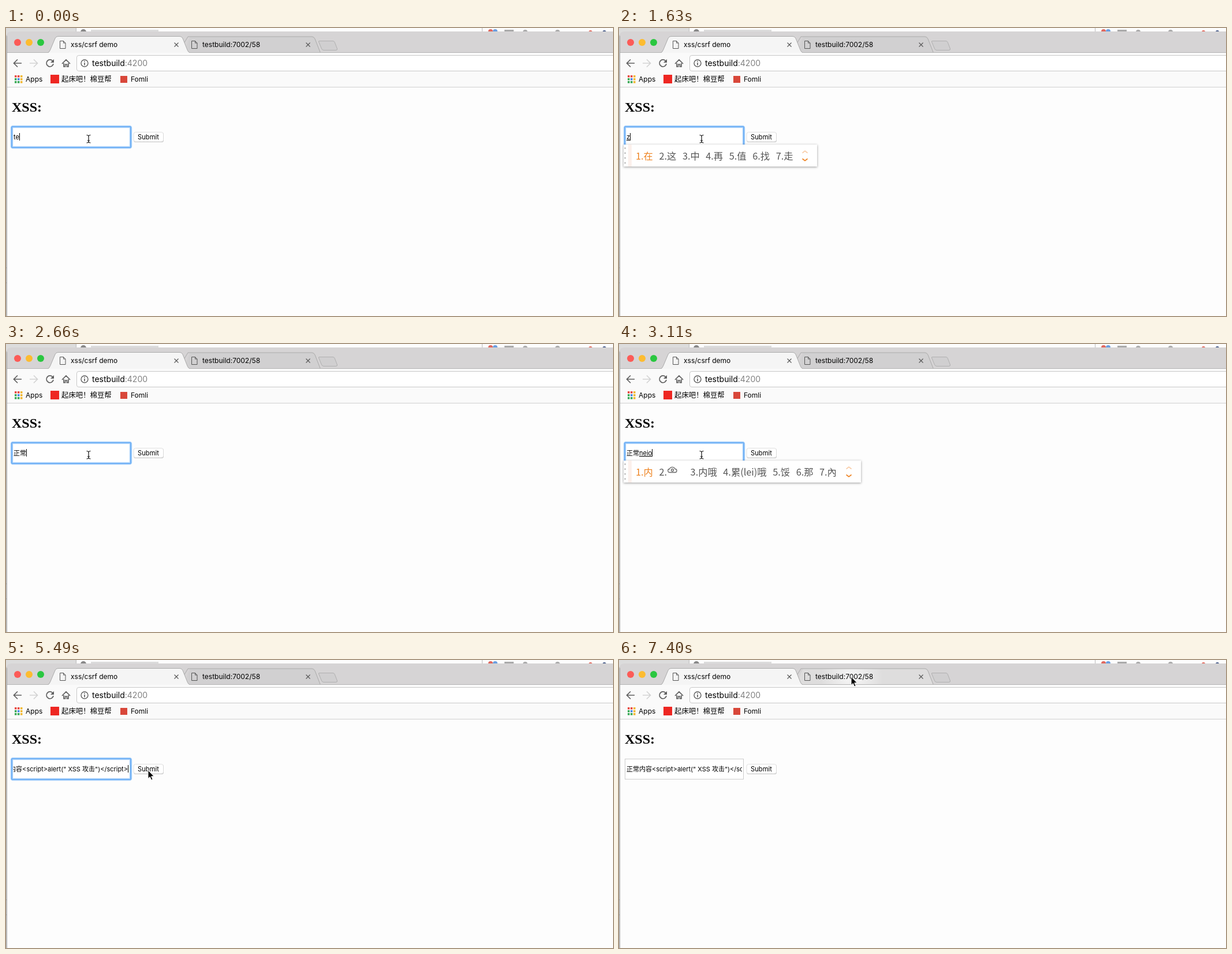
An HTML page for the animation above (7.99 s loop, 1051 by 499 pixels).

```html
<!DOCTYPE html>
<html lang="en">
<head>
<meta charset="utf-8">
<title>Form demo</title>
<style>
  html, body { margin: 0; width: 100%; height: 100%; overflow: hidden; background: #fdfdfd; }
  .layer { position: absolute; left: 0; top: 0; }
  text { font: 12px Inter, "Noto Sans CJK SC", "Noto Sans CJK", sans-serif; white-space: pre; }
  #input { font-size: 11px; }
  #label { font-size: 11.2px; }
  .icon { fill: none; stroke: #5f5f5f; stroke-width: 1.7; }
  .thin { fill: none; stroke: #555; stroke-width: 1; }
  #popup {
    position: absolute; left: 8px; top: 202px; height: 38px; box-sizing: border-box;
    padding: 0 42px 1px 21px; display: flex; gap: 10.6px; align-items: center; white-space: nowrap;
    background: #fff; box-shadow: 0 1px 4px #0006; color: #555;
    font: 300 16.3px "Noto Sans CJK SC", "Noto Sans CJK", sans-serif;
  }
  #popup span:first-of-type { color: #ee8321; }
  #popup .grip { position: absolute; left: 0; top: 0; }
  #popup .arrows { position: absolute; right: 14px; top: 7px; }
  #popup .cloud { margin: 0 12px 0 1px; vertical-align: 3px; }
</style>
</head>
<body>
<svg class="layer" width="1051" height="499">
  <defs>
    <clipPath id="field"><rect x="12.5" y="173" width="200.5" height="32"/></clipPath>
    <clipPath id="tabShape"><path d="M309 42L315 23 319 15H530L534 17 544 42Z"/></clipPath>
    <radialGradient id="glow"><stop stop-color="#fff" stop-opacity=".75"/><stop offset="1" stop-color="#fff" stop-opacity="0"/></radialGradient>
    <path id="doc" class="thin" d="M.5 .5H6.5L10 4V13.5H.5ZM6.5 .5V4H10"/>
    <path id="cross" d="M-3.500-3.500L3.500 3.500M3.500-3.500L-3.500 3.500" stroke="#555" stroke-width="1.1"/>
    <path id="caretShape" d="M-3.500-6.500Q0-6.500 0-4V4.500Q0 7-3.500 7M3.500-6.500Q0-6.500 0-4V4.500Q0 7 3.500 7M-2 3H2"/>
  </defs>

  <!-- windows behind -->
  <rect width="1051" height="20" fill="#fdfdfd"/>
  <path d="M0 0H121V12H0ZM147 3H264V8H147Z" fill="#dcdcdc"/>
  <path d="M121.500 0V6M824.500 0V6" stroke="#bbb"/>
  <circle cx="134" cy="7" r="5" fill="#888"/>
  <circle cx="839" cy="6" r="4" fill="#e0685e"/>
  <circle cx="847" cy="6" r="4" fill="#6a9ee0"/>
  <rect x="863" y="3" width="16" height="3" fill="#aaa"/>
  <g fill="#aaa"><circle cx="899" cy="7" r="4"/><circle cx="955" cy="7" r="4"/></g>
  <circle cx="1012" cy="7" r="3" fill="#e4695c"/>
  <circle cx="1036" cy="7" r="3" fill="#465a88"/>

  <!-- browser frame -->
  <path d="M1 499V14Q1 6 10 6H1051V499Z" fill="#d6d4d5"/>
  <path d="M0 12H2V499H0Z" fill="#c8c8c8"/>
  <path d="M1.500 14V499M0 415.500H2M0 441.500H2" stroke="#a2a2a2"/>
  <circle cx="20" cy="25" r="6" fill="#fc5b57"/>
  <circle cx="40" cy="25" r="6" fill="#fdbc30"/>
  <circle cx="60" cy="25" r="6" fill="#2ac740"/>

  <g clip-path="url(#tabShape)">
    <rect id="tab" x="300" y="14" width="250" height="30"/>
    <circle id="halo" cx="403" cy="30" r="54" fill="url(#glow)"/>
  </g>
  <path d="M309 25L315 15H530Q533 15 535 19L544 42" fill="none" stroke="#aaa"/>
  <path d="M541.500 24Q540.500 22.500 543 22.500H566Q568 22.500 569 24.500L573.500 36Q574 38.500 571 38.500H550Q547.500 38.500 546.500 36Z" fill="#d0cfd0" stroke="#b0b0b0"/>
  <path d="M2 43H1051V102H2Z" fill="#fafafa"/>
  <path d="M2 42.500H1051" stroke="#b4b4b4"/>
  <path d="M73 43Q75 42 77 37L85 18Q86.500 14.500 90 14.500H301Q304 14.500 306 18L314 38Q315.500 42 318 43Z" fill="#f5f5f5"/>
  <path d="M73 42.500Q75 42 77 37L85 18Q86.500 14.500 90 14.500H301Q304 14.500 306 18L314 38Q315.500 42 318 42.500" fill="none" stroke="#aaa"/>
  <use href="#doc" x="93" y="22"/><use href="#doc" x="321" y="22"/>
  <use href="#cross" x="295" y="29"/><use href="#cross" x="523" y="29"/>
  <text x="112" y="33">xss/csrf demo</text>
  <text x="340" y="33">testbuild:7002/58</text>

  <!-- toolbar -->
  <path class="icon" d="M27 61H14M20 54.500L13.500 61 20 67.500"/>
  <path class="icon" d="M41 61H54M48 54.500L54.500 61 48 67.500" opacity=".25"/>
  <path class="icon" d="M81 57.500A6 6 0 1 0 82 62"/><path d="M83 54V60H77Z" fill="#5f5f5f"/>
  <path class="icon" d="M97 62L104 55 111 62M100 61V67H102.500V63H105.500V67H108V61"/>
  <path d="M1051 47.500H126Q122.500 47.500 122.500 51V71Q122.500 74.500 126 74.500H1051" fill="#fff" stroke="#c8c8c8"/>
  <circle class="icon" cx="136" cy="61" r="6" style="stroke-width:1.4"/>
  <path class="icon" d="M136 57V58.500M136 60V64.500"/>
  <text x="149" y="66" style="font-size:14px">testbuild<tspan fill="#808080">:4200</tspan></text>

  <!-- bookmarks -->
  <g id="apps"></g>
  <text x="34" y="93">Apps</text>
  <rect x="77" y="81" width="15" height="15" fill="#ee2722"/>
  <text x="96" y="93" style="font-size:12.4px">起床吧！棉豆帮</text>
  <rect x="198" y="83" width="12" height="12" fill="#d8473a"/>
  <text x="216" y="93">Fomli</text>

  <!-- page -->
  <rect x="2" y="102" width="1049" height="397" fill="#fdfdfd"/>
  <path d="M2 102.500H1051" stroke="#cfcfcf"/>
  <text x="10" y="145" style="font:bold 24px 'Liberation Serif','Times New Roman',serif">XSS:</text>
  <rect x="10.500" y="171.500" width="205" height="35" fill="#fff" stroke="#ccc"/>
  <g id="ring" fill="none">
    <rect x="10" y="171" width="206" height="36" rx="2" stroke="#b2d6fc" stroke-width="4.500"/>
    <rect x="10" y="171" width="206" height="36" rx="1" stroke="#73b2f5" stroke-width="2.200"/>
  </g>
  <g clip-path="url(#field)">
    <text id="input" y="193"><tspan id="done"></tspan><tspan id="draft" text-decoration="underline"></tspan></text>
    <rect id="caret" y="182" width="1" height="13"/>
  </g>
  <rect x="221" y="181" width="52" height="17" rx="3.500" fill="#c4c4c4"/>
  <rect id="button" x="221" y="180.500" width="51.500" height="16.500" rx="3.500" stroke="#d8d8d8" stroke-width=".8"/>
  <text id="label" x="228" y="193">Submit</text>
</svg>
<div id="popup"></div>
<svg class="layer" width="1051" height="499">
  <g id="beam" fill="none">
    <use href="#caretShape" stroke="#fff" stroke-width="3"/>
    <use href="#caretShape" stroke="#111" stroke-width="1.2"/>
  </g>
  <path id="arrow" d="M0 0V14.500L3.300 11.500 5.600 17 8 16 5.700 10.700H10.300Z" stroke="#fff"/>
</svg>
<script>
const $ = id => document.getElementById(id);
const LOOP = 7990, BLUR = 5930, RELEASE = 6230, HOVER = 7250;
const NORMAL = '正常', CONTENT = '正常内容';
const ATTACK = CONTENT + '<script>alert(" XSS 攻击")<\/script>';
const CLOUD = '<svg class="cloud" width="17" height="13" fill="none" stroke="#666" stroke-width="1.3">' +
  '<path d="M4 10.500A3 3 0 0 1 3.500 4.500A5 4.500 0 0 1 13 4.500A3 3 0 0 1 13 10.500Z"/><circle cx="8.500" cy="6.500" r="2"/></svg>';

// time, committed text, caret shown, text being composed, candidates
const typing = [
  [0, 'te', 1], [290, 't', 1], [440, '', 1], [590, 'z', 1], [1040, 'z', 0], [1340, '', 0],
  [1630, '', 1, 'z', '在 这 中 再 值 找 走'],
  [1780, '', 1, 'zh', '这 中 值 找 之 只 着'],
  [1930, '', 1, 'zhe', '这 着 者 这个 折 哲 浙'],
  [2080, '', 1, 'zhen', '真 阵 镇 这呢 针 震 珍'],
  [2230, '', 1, 'zheng', '正 整 政 争 证 挣 征'],
  [2370, '', 1, 'zhengc', '正常 政策 正处 整场 争吵 整车 正'],
  [2520, '', 1, 'zhengch', '正常 正处 整场 争吵 整车 争宠 正'],
  [2660, NORMAL, 1],
  [2810, NORMAL, 1, 'n', '你 那 能 年 呢 女 哪'],
  [2960, NORMAL, 1, 'nei', '内 那 馁 哪 內 氖 娞'],
  [3110, NORMAL, 1, 'neio', '内 ☁ 内哦 累(lei)哦 馁 那 內'],
  [3260, NORMAL, 1, 'nei', '内 那 馁 哪 內 氖 娞'],
  [3410, NORMAL, 1, 'neir', '内容 内人 内热 那人 内 那 馁'],
  [3560, NORMAL, 1, 'neiro', '内容 内柔 内肉 那肉 内揉 那柔 内'],
  [3710, CONTENT, 1], [4010, CONTENT, 0],
  [4460, ATTACK, 1], [5050, ATTACK, 0], [5490, ATTACK, 1], [BLUR, ATTACK, 0]
];
// time, x, y, text cursor
const pointer = [
  [0, 143, 192, 1], [4900, 123, 200, 1], [5050, 148, 210], [5200, 196, 209], [5340, 236, 196], [5490, 246, 191],
  [6810, 254, 188], [6960, 318, 142], [7110, 371, 78], [HOVER, 396, 40], [7400, 402, 29]
];
const at = (steps, t) => steps.findLast(step => step[0] <= t);
const show = (id, on) => $(id).style.display = on ? '' : 'none';

['#e8453c', '#e8453c', '#f1b72f', '#35a853', '#4285e8', '#f1b72f', '#35a853', '#35a853', '#f1b72f'].forEach((fill, i) => {
  $('apps').innerHTML += `<rect x="${15 + i % 3 * 5}" y="${82 + (i / 3 | 0) * 5}" width="3.5" height="3.5" fill="${fill}"/>`;
});

function drawPopup(words) {
  show('popup', words);
  if (!words) return;
  $('popup').innerHTML = `<svg class="grip" width="16" height="38"><path d="M2.500 5V38" stroke="#bbb" stroke-width="2.5" stroke-dasharray="2.5 6"/>
    <path d="M9.500 0V38M12.500 0V38" stroke="#f5d5c8"/></svg>` +
    words.split(' ').map((word, i) => `<span>${i + 1}.${word === '☁' ? CLOUD : word}</span>`).join('') +
    `<svg class="arrows" width="14" height="24" fill="none" stroke="#ef8322" stroke-width="1.6">
    <path d="M2.500 7.500L7 4 11.500 7.500" opacity=".4"/><path d="M2.500 17.500L7 21 11.500 17.500"/></svg>`;
}

let current;
function drawField(state, focused) {
  const [, done, caret, draft = '', words] = state;
  $('done').textContent = done;
  $('draft').textContent = draft;
  const width = done + draft ? $('input').getComputedTextLength() : 0;
  const x = focused ? Math.min(13, 211 - width) : 13;
  $('input').setAttribute('x', x);
  $('caret').setAttribute('x', Math.round(x + width));
  show('caret', caret);
  show('ring', focused);
  drawPopup(words);
}

function frame(now) {
  const t = now % LOOP;
  const state = at(typing, t);
  if (state !== current) drawField(current = state, t < BLUR);

  const pressed = t >= BLUR && t < RELEASE;
  $('button').setAttribute('fill', pressed ? '#4a98f5' : '#fff');
  $('label').setAttribute('fill', pressed ? '#fff' : '#000');

  const [, x, y, beam] = at(pointer, t);
  show('beam', beam);
  show('arrow', !beam);
  $(beam ? 'beam' : 'arrow').setAttribute('transform', `translate(${x} ${y})`);
  $('tab').setAttribute('fill', t < HOVER ? '#d1d0d1' : '#dedddd');
  show('halo', t >= HOVER);
  requestAnimationFrame(frame);
}
requestAnimationFrame(frame);
</script>
</body>
</html>
```
